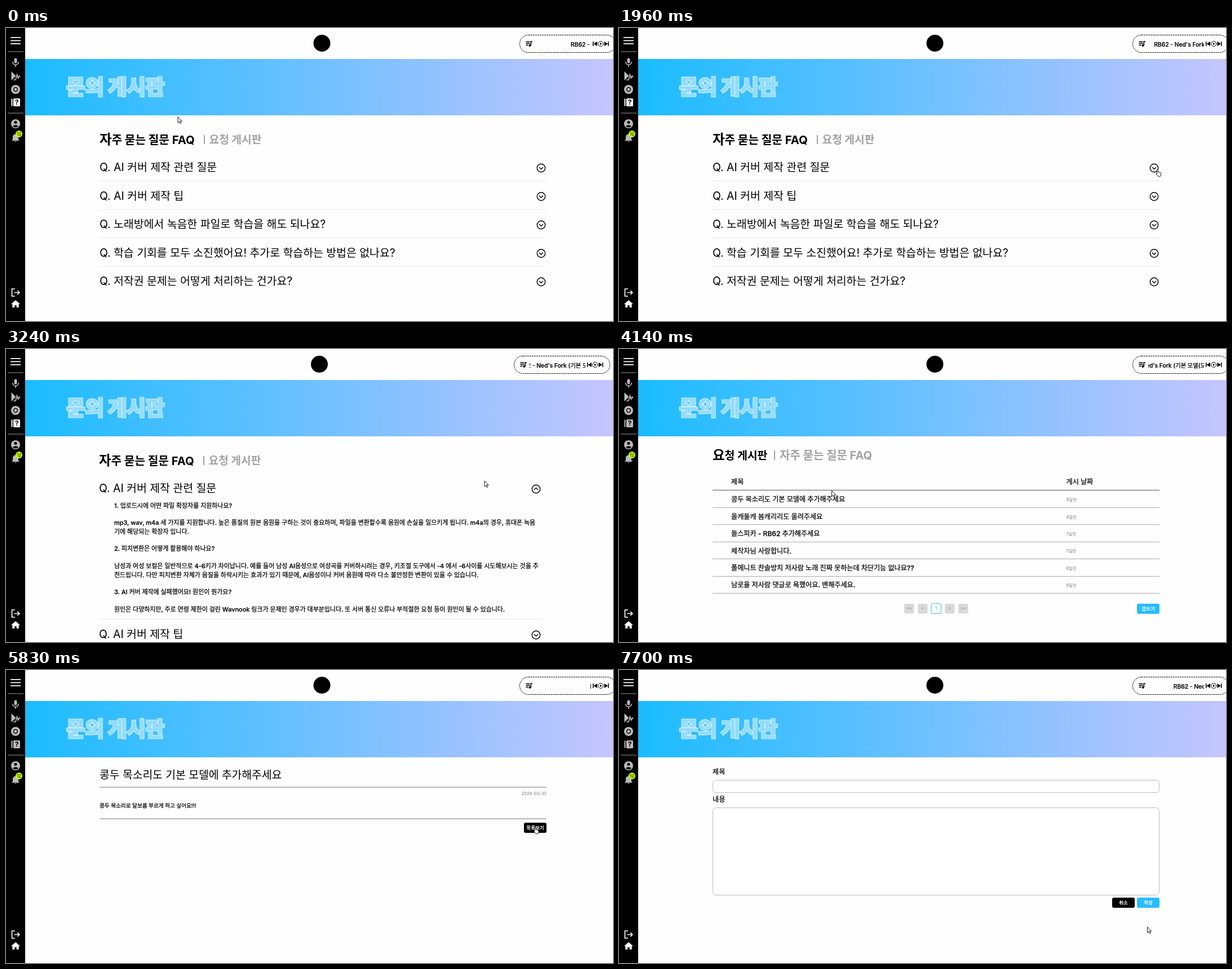
These frames come from a looping animation (1077x520 px, 7800 ms). An HTML page:

```html
<!DOCTYPE html>
<html lang="ko">
<head>
<meta charset="utf-8">
<style>
html, body { margin: 0; width: 100%; height: 100%; overflow: hidden; background: #fefefe }
svg { display: block; width: 100vw; height: 100vh }
text { font-family: Inter, "Noto Sans CJK KR", "Noto Sans CJK JP", "Noto Sans CJK SC", sans-serif; white-space: pre }
.line { fill: none; stroke: currentColor; stroke-width: 1.7 }
</style>
</head>
<body>
<svg id="stage" viewBox="0 0 1077 520"></svg>
<script>
// Markup helpers; text is placed by its vertical centre.
const text = (s, x, y, size, attrs = '') =>
  `<text x="${x}" y="${y + size * .37}" font-size="${size}" ${attrs}>${s}</text>`;
const box = (x, y, w, h, r, attrs) =>
  `<rect x="${x}" y="${y}" width="${w}" height="${h}" rx="${r}" ${attrs}/>`;
const path = (d, attrs = '') => `<path d="${d}" ${attrs}/>`;
const dot = (x, y, r, attrs = '') => `<circle cx="${x}" cy="${y}" r="${r}" ${attrs}/>`;
const rule = (y, color, x2 = 959) => path(`M166 ${y}H${x2}`, `stroke="${color}"`);
const button = (s, x, y, color) => box(x, y, 40, 18, 3, `fill="${color}"`) +
  text(s, x + 20, y + 9, 8.5, 'fill="#fff" font-weight="700" text-anchor="middle"');
const BOLD = 'font-weight="700"', MEDIUM = 'font-weight="500" stroke="#000" stroke-width=".25"';
const GREY = BOLD + ' fill="#a2a2a2"', SKY = '#29bcff';

const star = (x, y, r) =>
  path(`M${x} ${y - r}Q${x} ${y} ${x + r} ${y}Q${x} ${y} ${x} ${y + r}Q${x} ${y} ${x - r} ${y}Q${x} ${y} ${x} ${y - r}`,
    'fill="#3fc0ff" stroke="#fff" stroke-width=".8"');

function banner() {
  const title = (color, width) => text('문의 게시판', 107, 104.5, 36.3,
    `font-weight="900" fill="${color}" stroke="${color}" stroke-width="${width}"`);
  return `<linearGradient id="sky"><stop stop-color="#1abcff"/><stop offset="1" stop-color="#c6c5ff"/></linearGradient>` +
    box(34, 55, 1043, 100, 0, 'fill="url(#sky)"') +
    title('#e4f6ff', 3.4) + title('#92dcff', 1.6) + star(123.5, 96, 5) + star(153, 98, 6);
}

function sidebar() {
  const line = 'class="line"';
  return box(0, 0, 34, 520, 0, '') +
    path('M8 16.8H26M8 22.3H26M8 27.8H26', 'stroke="#fff" stroke-width="1.8"') +
    path('M3 42H31M3 151H31', 'stroke="#999"') +
    `<g fill="#bbb" color="#bbb">` +
    box(14.5, 53.5, 5, 9, 2.5, '') + path('M11.7 60a5.3 5.3 0 0 0 10.6 0M17 65.5V69', line) +
    path('M9.5 77l8 8-8 8z') + path('M13 92h4l2.5-9 2 6 2-4 1.5 2', line) +
    dot(17, 109, 8) + dot(17, 109, 3.4, 'stroke="#000" stroke-width="1.5"') +
    dot(17, 170, 8) + dot(17, 167.3, 2.6, 'fill="#000"') + path('M11.8 174.3q5.2-4.3 10.4 0q-5.2 4.6-10.4 0z', 'fill="#000"') +
    path('M10 200h14l-2-2.2v-4.3q0-4.6-5-5.2q-5 .6-5 5.2v4.3zM15 201h4q-2 2.4-4 0z') + '</g>' +
    `<g id="help">` + box(9.5, 125.5, 2, 13, 0, '') + box(13, 125, 12, 14, 1.5, '') +
    text('?', 19, 132, 12, 'fill="#000" font-weight="700" text-anchor="middle"') + '</g>' +
    dot(23, 188, 6, 'fill="#c6ff00"') + text('12', 23, 188, 8, 'text-anchor="middle"') +
    path('M16 463h-5.5v13H16M14.5 469.5h9M20.3 466l3.5 3.5-3.5 3.5', 'class="line" color="#fff"') +
    path('M17 483l8 7h-2.3v6h-4v-4h-3.4v4h-4v-6H9z', 'fill="#fff"');
}

function player() {
  return '<clipPath id="slot">' + box(939, 16, 99, 24, 0, '') + '</clipPath><g id="player">' +
    box(911.5, 12.5, 170, 31, 15.5, 'fill="none" stroke="#111" stroke-dasharray="3 1"') +
    path('M922.5 24.3h7M922.5 27.3h7M922.5 30.3h4M931.3 31V24.2H934', 'class="line" color="#111"') +
    dot(929.5, 31, 2) +
    `<g clip-path="url(#slot)"><g id="song">` + text("RB62 - Ned's Fork (기본 모델(모루바핑))", 0, 29, 10.3, MEDIUM) + '</g></g>' +
    path('M1041 24h1.5v8h-1.5zM1049 24v8l-6.5-4zM1061.5 24v8l6.5-4zM1068 24h1.5v8h-1.5zM1054 25.8v4.4l3.5-2.2z') +
    dot(1055.2, 28, 4.5, 'fill="none" stroke="#000"') + '</g>';
}

const questions = ['AI 커버 제작 관련 질문', 'AI 커버 제작 팁', '노래방에서 녹음한 파일로 학습을 해도 되나요?',
  '학습 기회를 모두 소진했어요! 추가로 학습하는 방법은 없나요?', '저작권 문제는 어떻게 처리하는 건가요?'];
const answers = [
  '1. 업로드시에 어떤 파일 확장자를 지원하나요?', '',
  'mp3, wav, m4a 세 가지를 지원합니다. 높은 품질의 원본 음원을 구하는 것이 중요하며, 파일을 변환할수록 음원에 손실을 일으키게 됩니다. m4a의 경우, 휴대폰 녹음',
  '기에 해당되는 확장자 입니다.', '',
  '2. 피치변환은 어떻게 활용해야 하나요?', '',
  '남성과 여성 보컬은 일반적으로 4-6키가 차이납니다. 예를 들어 남성 AI음성으로 여성곡을 커버하시려는 경우, 키조절 도구에서 -4 에서 -6사이를 시도해보시는 것을 추',
  '천드립니다. 다만 피치변환 자체가 음질을 하락시키는 효과가 있기 때문에, AI음성이나 커버 음원에 따라 다소 불안정한 변환이 있을 수 있습니다.', '',
  '3. AI 커버 제작에 실패했어요! 원인이 뭔가요?', '',
  '원인은 다양하지만, 주로 연령 제한이 걸린 Wavnook 링크가 문제인 경우가 대부분입니다. 또 서버 통신 오류나 부적절한 요청 등이 원인이 될 수 있습니다.'];
const posts = [['콩두 목소리도 기본 모델에 추가해주세요', 4], ['올캐둘캐 봄캐리리도 올려주세요', 4],
  ['돌스피카 - RB62 추가해주세요', 7], ['제작자님 사랑합니다.', 7],
  ['폴메니트 찬솔방치 저사람 노래 진짜 못하는데 차단기능 없나요??', 8], ['남로율 저사람 댓글로 욕했어요. 밴해주세요.', 8]];

function question(i, y, right, up = false) {
  const x = right - 9.5, d = up ? -1 : 1;
  return text('Q. ' + questions[i], 166, y, 19.4) +
    dot(x, y + 1.5, 7.2, 'fill="none" stroke="#000" stroke-width="1.4"') +
    path(`M${x - 3.5} ${y + 1.5 - d * 1.5}l3.5 ${d * 3.5} 3.5 ${-d * 3.5}`, 'fill="none" stroke="#000" stroke-width="1.4"');
}

const faqTabs = text('자', 166, 197.5, 23.5, 'font-weight="900"') + text('주 묻는 질문 FAQ', 187.5, 198.5, 20.2, BOLD) +
  path('M352 190V206', 'stroke="#a2a2a2" stroke-width="2"') + text('요청 게시판', 360.5, 198, 19.2, GREY);

function faqPage() {
  return faqTabs + questions.map((_, i) => question(i, 247 + i * 50.5, 959) +
    (i < 4 ? rule(271.5 + i * 50.5, '#e8e8e8') : '')).join('');
}

function openPage() {
  return '<g transform="translate(-1)">' + faqTabs + question(0, 247, 951, true) +
    answers.map((s, i) => text(s, 193, 277.5 + i * 15.37, 10.95, MEDIUM)).join('') +
    rule(479.5, '#e8e8e8', 951) + question(1, 506, 951) + '</g>';
}

function listPage() {
  const pager = ['&lt;&lt;', '&lt;', '1', '&gt;', '&gt;&gt;'].map((s, i) => {
    const x = 506 + i * 24, on = s == '1';
    return box(x, 452, 17.5, 17.5, 2.5, on ? `fill="#fff" stroke="${SKY}"` : 'fill="#d9d9d9"') +
      text(s, x + 8.7, 460.5, 8, `text-anchor="middle" fill="${on ? SKY : '#888'}"`);
  });
  return text('요', 166, 188, 23.5, 'font-weight="900"') + text('청 게시판', 187.5, 189, 19.4, BOLD) +
    path('M276 180V197', 'stroke="#a2a2a2" stroke-width="2"') + text('자주 묻는 질문 FAQ', 285, 188.5, 20, GREY) +
    text('제목', 199, 236, 12.1, MEDIUM) + text('게시 날짜', 793.5, 236, 12.1, MEDIUM) + rule(250.5, '#555') +
    posts.map(([s, days], i) => {
      const y = 267 + i * 30.4;
      return text(s, 199, y, 12.1, MEDIUM) + text(days + '일전', 793.5, y + .5, 7.3, 'fill="#777"') +
        rule(Math.round(y + 14) + .5, '#aaa');
    }).join('') + pager.join('') + button('글쓰기', 919, 452, SKY);
}

function postPage() {
  return text(posts[0][0], 166, 185.5, 19.3) + rule(208, '#777') +
    text('2024-03-30', 959, 219.5, 7.5, 'fill="#777" text-anchor="end"') +
    text('콩두 목소리로 달보름 부르게 하고 싶어요!!!', 166, 240, 9.6, MEDIUM) +
    rule(264, '#777') + button('목록보기', 919, 271, '#000');
}

function formPage() {
  const field = 'fill="#fff" stroke="#bbb"';
  return text('제목', 166, 180.5, 12.1, MEDIUM) + box(166.5, 195.5, 792, 22, 5, field) +
    text('내용', 166, 229.5, 12.1, MEDIUM) + box(166.5, 244.5, 792, 155, 6, field) +
    button('취소', 875, 404, '#000') + button('작성', 919, 404, SKY);
}

const pages = { faq: faqPage(), open: openPage(), list: listPage(), post: postPage(), form: formPage() };
const schedule = [[0, 'faq'], [2050, 'open'], [3290, 'faq'], [3640, 'list'], [4400, 'post'], [5870, 'list'], [7000, 'form']];
// Pointer stops: time, x, y.
const stops = [[0, 304.5, 157.5], [250, 304.5, 157.5], [900, 305, 256], [1080, 310, 256], [1550, 1037, 250],
  [1800, 955, 251.5], [1960, 954.5, 251.5], [2800, 953, 250], [3240, 848.5, 233.5], [3600, 405, 199], [3700, 405, 199],
  [4140, 377, 251], [4280, 377, 264], [4420, 377, 264], [5040, 584.5, 269], [5730, 930, 268], [5830, 938, 279],
  [5900, 938, 279], [6620, 921.5, 445], [6850, 937, 455.5], [7800, 937, 455.5]];
const handTimes = [[1750, 2950], [3540, 3660], [4200, 4400], [5800, 5880], [6720, 7000]];

stage.innerHTML = banner() + dot(560.5, 27, 15, 'id="mark"') + player() + sidebar() + '<g id="page"></g>' +
  '<g id="pointer" fill="#fff" stroke="#000" stroke-width=".9" stroke-linejoin="round">' +
  path('M.5.5V10.8L2.9 8.6 4.6 12.2 6.2 11.4 4.6 8H7.7Z', 'id="arrow"') +
  path('M0 1q0-1.3 1-1.3t1 1.3v3.5q1-.8 1.7.2q1-.6 1.7.3q1.6-.4 1.6 1.2v2.3q0 2-1 3.2h-4q-1.5-2-3.5-4.5q-.3-1.4 1.5-.2z', 'id="hand"') + '</g>';

const $ = id => document.getElementById(id);
const move = (id, x, y = 0) => $(id).setAttribute('transform', `translate(${x} ${y})`);
const show = (id, on) => $(id).setAttribute('visibility', on ? 'visible' : 'hidden');
let shown;

function pointerAt(t) {
  const i = stops.findIndex(s => s[0] > t), [t0, x0, y0] = stops[i - 1], [t1, x1, y1] = stops[i];
  const p = (t - t0) / (t1 - t0), e = p * p * (3 - 2 * p);
  return [x0 + (x1 - x0) * e, y0 + (y1 - y0) * e];
}

function draw(now) {
  const t = now % 7800;
  const name = schedule.filter(s => s[0] <= t).pop()[1];
  if (name != shown) {
    $('page').innerHTML = pages[shown = name];
    const scrolls = name == 'open';
    move('player', scrolls ? -10 : 0);
    move('mark', scrolls ? -4.5 : 0);
    $('help').setAttribute('fill', name == 'faq' || scrolls ? '#fff' : '#bbb');
  }
  // The ticker restarts when the list is opened again.
  move('song', t < 5730 ? 1002 - t * .0269 : 1039 - (t - 5730) * .028);
  move('pointer', ...pointerAt(t));
  const hand = handTimes.some(([a, b]) => t >= a && t < b);
  show('hand', hand);
  show('arrow', !hand);
  requestAnimationFrame(draw);
}
requestAnimationFrame(draw);
</script>
</body>
</html>
```
